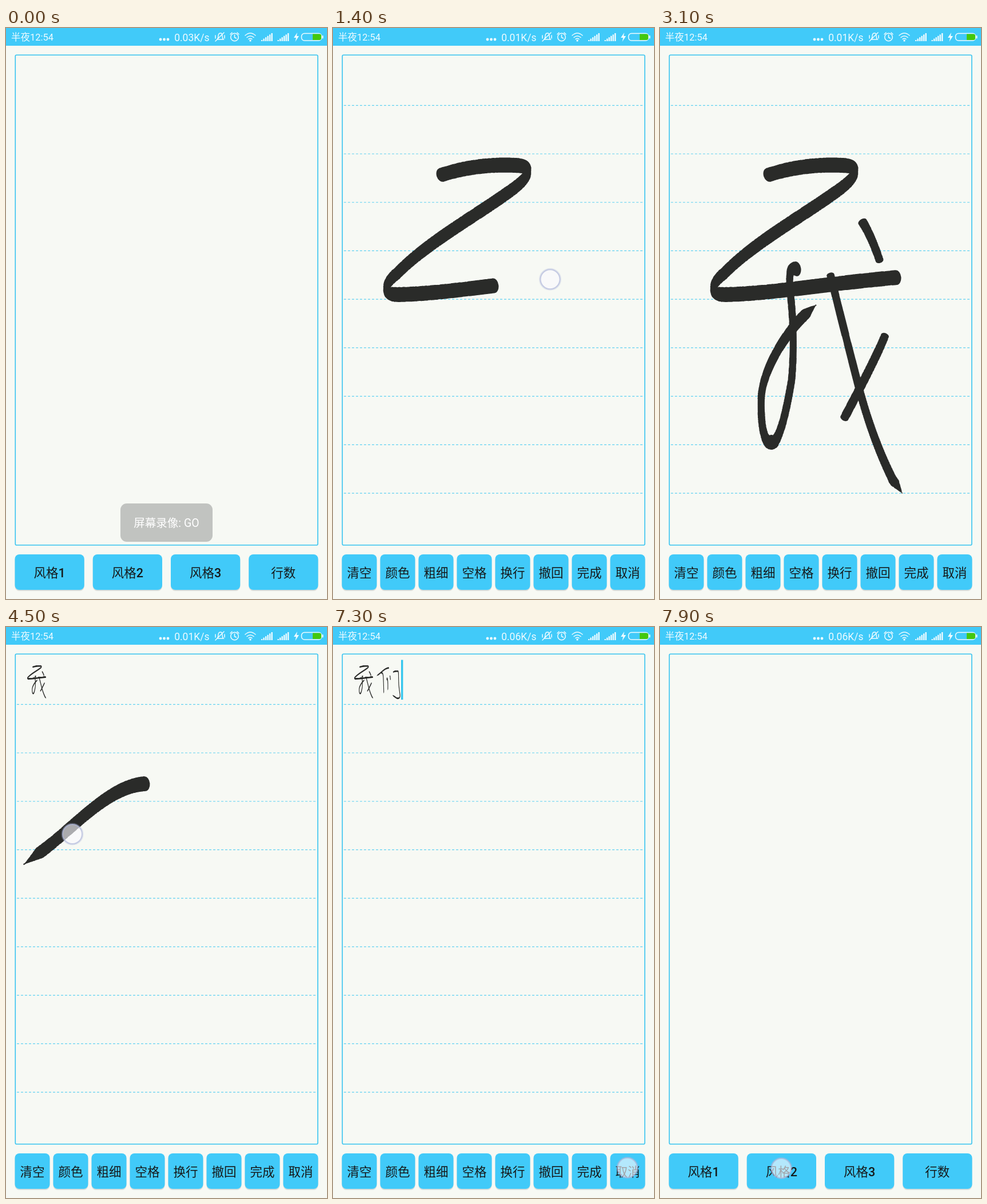
An HTML page that plays this animation: 561 px wide and 998 px high, repeating every 8000 ms.

```html
<!DOCTYPE html>
<html lang="zh-CN">
<head>
<meta charset="utf-8">
<title>手写板</title>
<style>
html, body { margin: 0; width: 100%; height: 100%; overflow: hidden; background: #f7f9f4; }
svg { display: block; width: 100vw; height: 100vh; }
text { font-family: Roboto, "Noto Sans CJK SC", "Noto Sans CJK", sans-serif; }
.paper { fill: #f7f9f4; }
.blue { fill: #41caf9; }
.label { font-size: 21.5px; text-anchor: middle; fill: #16191a; }
.label tspan { font-weight: 500; }
.shadow { fill: #87989c; opacity: .3; }
.frame { fill: none; stroke: #35c3f0; stroke-width: 1.6; }
.rule { stroke: #62d1f1; stroke-width: 1.2; stroke-dasharray: 4 3; }
.ink { fill: #2a2b29; }
.status { fill: #effbff; }
.line { fill: none; stroke: #effbff; stroke-width: 1.5; stroke-linecap: round; }
</style>
</head>
<body>
<svg viewBox="0 0 561 998" preserveAspectRatio="none">
  <defs>
    <g id="sheet">
      <rect class="paper" width="561" height="998"/>
      <rect class="blue" width="561" height="31"/>
      <rect class="frame" x="16.3" y="47.3" width="528.6" height="856.5" rx="2"/>
    </g>
  </defs>
  <g id="home"><use href="#sheet"/></g>
  <rect id="dim" width="561" height="998"/>
  <g id="page">
    <use href="#sheet"/>
    <g id="rules"></g>
    <rect id="cursor" y="57.5" width="3.4" height="69.5" fill="#35c6ee"/>
    <path id="ink" class="ink"/>
  </g>
  <g id="statusbar">
    <text class="status" x="9" y="22" font-size="16.5">半夜12:54</text>
    <text id="speed" class="status" x="355.5" y="22.5" font-size="17.5" text-anchor="end"></text>
    <path class="line" d="M369 20q2-2 2-6q0-5 4-5q3 0 3 5q0 4 2 6zM366 23L381 8M366 13v5M382 13v5"/>
    <g class="line"><circle cx="399.5" cy="16" r="6.8"/><path d="M399.5 12v4.5l3 1.5M392 11l3-3M407 11l-3-3"/></g>
    <path class="line" d="M418 13q9-8 18 0M421 16.5q6-5 12 0M424 19.5q3-2.5 6 0"/>
    <circle class="status" cx="427" cy="22" r="1.7"/>
    <path class="status" d="M509 8l-6 9h4l-1.5 7l6.5-10h-4z"/>
    <rect x="516.5" y="9.5" width="35" height="12.5" rx="5" class="line"/>
    <path d="M536 10.5h12q3 0 3 3v4.500q0 3-3 3h-12z" fill="#43c80d"/>
    <rect class="status" x="552.5" y="13" width="2" height="5.5" rx="1"/>
  </g>
  <g id="toast">
    <rect x="200" y="831" width="161" height="67" rx="11" fill="#c1c3c0"/>
    <text x="280.5" y="872" font-size="19.5" fill="#fff" text-anchor="middle">屏幕录像: GO</text>
  </g>
  <g id="touch">
    <circle r="18.5" fill="none" stroke="#a9b2d8" stroke-width="2" opacity=".3"/>
    <circle r="17" fill="#fafbff" fill-opacity=".62" stroke="#b4bbdc" stroke-opacity=".75" stroke-width="2"/>
  </g>
</svg>
<script>
const $ = id => document.getElementById(id);
const W = 561, LOOP = 8000, STEP = 100;
const INK_LAG = 60, SPACING = 1.6;
const MINI = 0.099, MINI_Y = 44.5;

const clamp = v => Math.min(1, Math.max(0, v));
const ramp = (t, from, to) => clamp((t - from) / (to - from));
const easeOut = u => 1 - (1 - u) ** 3;
const active = (list, t) => list.find(e => t >= e.from && t < e.to);
const show = (el, on) => el.setAttribute('visibility', on ? 'visible' : 'hidden');
const move = (el, x, y = 0) => el.setAttribute('transform', `translate(${x} ${y})`);

function create(tag, attrs) {
  const el = document.createElementNS('http://www.w3.org/2000/svg', tag);
  for (const key in attrs) el.setAttribute(key, attrs[key]);
  return el;
}

function add(parent, tag, attrs, html = '') {
  const el = create(tag, attrs);
  el.innerHTML = html;
  parent.append(el);
  return el;
}

function addButtons(parent, labels, gap) {
  const pitch = (530 + gap) / labels.length, width = pitch - gap;
  labels.forEach((label, i) => {
    const x = 15.5 + i * pitch;
    add(parent, 'rect', { class: 'shadow', x, y: 922, width, height: 62, rx: 8 });
    add(parent, 'rect', { class: 'blue', x, y: 920, width, height: 62, rx: 8 });
    add(parent, 'text', { class: 'label', x: x + width / 2, y: 960 },
      label.replace(/\d/, '<tspan>$&</tspan>'));
  });
}

addButtons($('home'), ['风格1', '风格2', '风格3', '行数'], 15);
addButtons($('page'), ['清空', '颜色', '粗细', '空格', '换行', '撤回', '完成', '取消'], 6);

for (let i = 0; i < 9; i++) {
  const y = 135.3 + i * 84.72;
  add($('rules'), 'line', { class: 'rule', x1: 19, x2: 541, y1: y, y2: y });
}
for (let i = 0; i < 3; i++) {
  add($('statusbar'), 'circle', { class: 'status', cx: 270 + i * 6.5, cy: 20, r: 2.4 });
}
for (const x of [446, 474.5]) {
  for (let i = 0; i < 6; i++) {
    const height = 2 + i * 2.4;
    add($('statusbar'), 'rect', { class: 'status', x: x + i * 3.5, y: 23 - height, width: 2.4, height });
  }
}

// A flat nib: broad along horizontal strokes, narrow along vertical ones,
// optionally thinning to a point over the last `taper` pixels.
function makeStroke(from, speed, d, taper = 0) {
  const path = create('path', { d });
  const length = path.getTotalLength();
  const points = [], dabs = [];
  for (let s = 0; s <= length; s += SPACING) {
    const { x, y } = path.getPointAtLength(s);
    const a = path.getPointAtLength(Math.max(0, s - 5));
    const b = path.getPointAtLength(Math.min(length, s + 5));
    const angle = Math.atan2(b.y - a.y, b.x - a.x);
    const tip = taper ? Math.max(0.12, clamp((length - s) / taper)) : 1;
    const r = (6.5 + 6.6 * Math.cos(angle) ** 2) * tip;
    points.push([x, y]);
    dabs.push(dab(x, y, r, angle));
  }
  return { from, to: from + length / speed, points, dabs };
}

function dab(x, y, r, angle) {
  const rx = r * 0.65, dx = Math.cos(angle) * rx, dy = Math.sin(angle) * rx;
  const arc = `a${rx.toFixed(2)} ${r.toFixed(2)} ${(angle * 180 / Math.PI).toFixed(1)} 0 1 `;
  const delta = k => `${(k * dx).toFixed(2)} ${(k * dy).toFixed(2)}`;
  return `M${(x - dx).toFixed(2)} ${(y - dy).toFixed(2)}${arc}${delta(2)}${arc}${delta(-2)}z`;
}

const WO_SPEED = 1.65, MEN_SPEED = 2.57;
const wo = [
  makeStroke(930, WO_SPEED, 'M189 257Q250 237 318 240C356 241 340 264 308 286C250 328 165 375 113 428C84 452 92 466 113 466C200 464 280 448 414 436'),
  makeStroke(1620, WO_SPEED, 'M238 421C224 420 226 440 228 465C234 520 234 570 230 615Q212 724 195 724C178 724 176 680 177 645C180 595 225 520 273 484', 25),
  makeStroke(2270, WO_SPEED, 'M298 432Q312 490 348 630Q372 720 407 790L424 814', 25),
  makeStroke(2680, WO_SPEED, 'M393 538Q380 572 322 682'),
  makeStroke(2930, WO_SPEED, 'M354 339Q370 365 384 407')
];
const men = [
  makeStroke(4180, MEN_SPEED, 'M243 274C195 277 150 318 105 357Q75 384 31 415', 35),
  makeStroke(4500, MEN_SPEED, 'M116 362C145 352 149 410 151 445Q155 540 158 665L159 728', 33),
  makeStroke(4860, MEN_SPEED, 'M215 487C213 448 220 446 226 482Q233 540 231 640L230 674', 33),
  makeStroke(5170, MEN_SPEED, 'M268 412Q273 440 277 481'),
  makeStroke(5410, MEN_SPEED, 'M329 347C348 329 375 332 405 331Q419 329 419 395Q420 490 424 575Q434 665 443 728C452 790 437 812 397 811Q350 785 312 750', 30)
];

function makeGlyph(strokes, commitAt, x) {
  const mini = add($('page'), 'path', {
    class: 'ink', d: strokes.map(s => s.dabs.join('')).join(''),
    transform: `translate(${x} ${MINI_Y}) scale(${MINI})`
  });
  return { strokes, commitAt, mini };
}

const glyphs = [makeGlyph(wo, 3800, 28.3), makeGlyph(men, 6800, 73)];
const taps = [
  { from: 200, to: 400, x: 76, y: 946 },
  { from: 7100, to: 7320, x: 514.5, y: 945 },
  { from: 7900, to: 8000, x: 212, y: 946 }
];
const cursors = [
  { from: 0, to: 930, x: 34 },
  { from: 3800, to: 4180, x: 71.5 },
  { from: 6800, to: 8000, x: 119 }
];

function inkAt(t) {
  const glyph = glyphs.find(g => t < g.commitAt);
  if (!glyph) return '';
  return glyph.strokes.map(({ from, to, dabs }) =>
    dabs.slice(0, Math.round(ramp(t - INK_LAG, from, to) * dabs.length)).join('')).join('');
}

function touchAt(t) {
  const tap = active(taps, t);
  if (tap) return [tap.x, tap.y];
  const stroke = active([...wo, ...men], t);
  if (!stroke) return null;
  const { from, to, points } = stroke;
  return points[Math.floor(ramp(t, from, to) * (points.length - 1))];
}

function render(t) {
  const open = easeOut(ramp(t, 406, 906)) - easeOut(ramp(t, 7320, 7700));
  move($('home'), -0.227 * W * open);
  move($('page'), W * (1 - open));
  $('dim').setAttribute('opacity', 0.36 * open);

  $('toast').setAttribute('opacity', 1 - ramp(t, 0, 400));
  $('speed').textContent = (t < 1100 ? '0.03' : t < 5100 ? '0.01' : '0.06') + 'K/s';
  $('ink').setAttribute('d', inkAt(t));
  for (const { mini, commitAt } of glyphs) show(mini, t >= commitAt);

  const cursor = active(cursors, t);
  show($('cursor'), cursor);
  if (cursor) $('cursor').setAttribute('x', cursor.x);

  const touch = touchAt(t);
  show($('touch'), touch);
  if (touch) move($('touch'), ...touch);
}

const start = performance.now();
let last = -1;
function tick() {
  const t = Math.floor((performance.now() - start) % LOOP / STEP) * STEP;
  if (t !== last) render(last = t);
  requestAnimationFrame(tick);
}
tick();
</script>
</body>
</html>
```
